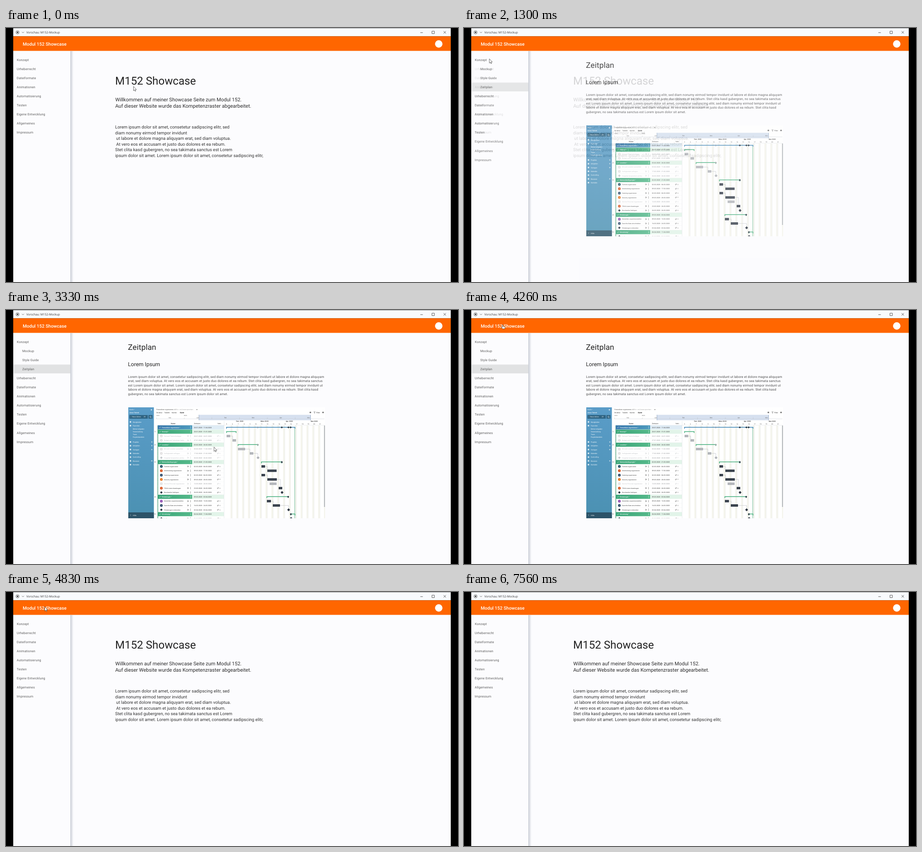
Animation, 998 px wide and 561 px high, one loop 7.59 s. Source, as an HTML page:

```html
<!DOCTYPE html>
<html lang="de">
<head>
<meta charset="utf-8">
<title>Showcase</title>
<style>
  html, body { margin: 0; width: 100%; height: 100%; overflow: hidden; background: #000; }
  svg { display: block; width: 998px; height: 561px; }
  text { font-family: Roboto, sans-serif; white-space: pre; text-rendering: geometricPrecision; }
</style>
</head>
<body>
<svg id="stage" viewBox="0 0 998 561"></svg>
<script>
const LOOP = 7590;
const PAGE = '#fcfcfe';

const rect = (x, y, w, h, fill, extra = '') =>
  `<rect x="${x}" y="${y}" width="${w}" height="${h}" fill="${fill}" ${extra}/>`;
const path = (d, stroke, width = 1, fill = 'none') =>
  `<path d="${d}" fill="${fill}" stroke="${stroke}" stroke-width="${width}"/>`;
const dot = (x, y, r, fill) => `<circle cx="${x}" cy="${y}" r="${r}" fill="${fill}"/>`;
const diamond = (x, y, fill, r = 3.2) => path(`M${x - r} ${y}l${r} ${-r} ${r} ${r} ${-r} ${r}z`, 'none', 0, fill);
const text = (x, y, size, str, fill = '#222', extra = '') =>
  `<text x="${x}" y="${y}" font-size="${size}" fill="${fill}" ${extra}>${str}</text>`;
const lines = (x, y, step, size, list, fill, extra) =>
  list.map((str, i) => text(x, y + i * step, size, str, fill, extra)).join('');

const SPACED = 'letter-spacing=".125"';
const BOLD = 'font-weight="500"';
const MIDDLE = 'text-anchor="middle"';

const topics = ['Urheberrecht', 'Dateiformate', 'Animationen', 'Automatisierung',
  'Testen', 'Eigene Entwicklung', 'Allgemeines', 'Impressum'];

function sidebar(sub) {
  const item = (str, i, x) => text(x, 72.7 + i * 20.08, 7.04, str, '#5c5c5c', SPACED);
  return rect(16, 50, 966, 511, PAGE) +
    rect(142, 51, 7, 510, 'url(#shade)') +
    (sub.length ? rect(17, 120.5, 125, 19.5, '#e1e2e3') : '') +
    item('Konzept', 0, 24) +
    sub.map((s, i) => item(s, i + 1, 36)).join('') +
    topics.map((s, i) => item(s, i + 1 + sub.length, 23.8)).join('');
}

function homePage() {
  return sidebar([]) +
    text(241, 124.7, 24.15, 'M152 Showcase') +
    lines(241.2, 161.6, 14.6, 11.05, [
      'Willkommen auf meiner Showcase Seite zum Modul 152.',
      'Auf dieser Website wurde das Kompetenzraster abgearbeitet.'], '#2a2a2a') +
    lines(241, 222, 12.6, 9.55, [
      'Lorem ipsum dolor sit amet, consetetur sadipscing elitr, sed',
      'diam nonumy eirmod tempor invidunt',
      ' ut labore et dolore magna aliquyam erat, sed diam voluptua.',
      ' At vero eos et accusam et justo duo dolores et ea rebum.',
      'Stet clita kasd gubergren, no sea takimata sanctus est Lorem',
      'ipsum dolor sit amet. Lorem ipsum dolor sit amet, consetetur sadipscing elitr,'], '#333');
}

// kind, label, period, bar start, bar end (a single start means a milestone)
const rows = [
  ['main', 'Firmenfeier organisieren', '20.01.2020 - 11.04.2020', 487, 638],
  ['group', 'Konzept', '20.01.2020 - 31.01.2020', 487, 508],
  ['done', 'Ziel und Thema festlegen', '20.01.2020 - 24.01.2020', 487, 495],
  ['done', 'Budget und Teilnehmer festle...', '27.01.2020 - 31.01.2020', 500, 508],
  ['group', 'Location', '03.02.2020 - 26.02.2020', 512.5, 556],
  ['done', 'Ort und Location auswählen', '03.02.2020 - 11.02.2020', 512, 528],
  ['done', 'Verfügbarkeit anfragen', '17.02.2020 - 21.02.2020', 538, 546],
  ['done', 'Vorgehen besprechen und bu...', '26.02.2020 - 26.02.2020', 556.5],
  ['group', 'Rahmenbedingungen', '02.03.2020 - 21.03.2020', 564, 609],
  ['#1d4e63', 'Technik organisieren', '02.03.2020 - 06.03.2020', 564, 572],
  ['#d9541e', 'Unterhaltung organisieren', '09.03.2020 - 17.03.2020', 577, 597.5],
  ['#2a4868', 'Catering organisieren', '02.03.2020 - 06.03.2020', 564, 572],
  ['#e8751a', 'Security organisieren', '09.03.2020 - 20.03.2020', 577, 598],
  ['done', 'Service-Personal organisieren', '12.03.2020 - 20.03.2020', 582, 597.5],
  ['#d9541e', 'TOVA-Lizenz beantragen', '23.03.2020 - 26.03.2020', 602, 610],
  ['#26343f', 'Druckwerke festlegen', '26.03.2020 - 26.03.2020', 609.5],
  ['group', 'Einladungen', '09.03.2020 - 03.04.2020', 576, 623],
  ['#8e4ab0', 'Gästeliste zusammenstellen', '09.03.2020 - 13.03.2020', 576, 585],
  ['#2a4868', 'Save-the-Date einschreiben', '16.03.2020 - 24.03.2020', 589, 605],
  ['#26343f', 'Einladungen vorbereiten', '03.04.2020 - 03.04.2020', 624],
  ['group', 'Umsetzung', '06.04.2020 - 11.04.2020', 629, 638],
  ['#26343f', 'Aufbau', '06.04.2020 - 06.04.2020', 629.5]
];
const rowY = i => 259.2 + i * 9.585;

function ganttRow([kind, label, period, from, to], i) {
  const y = rowY(i), summary = kind === 'main' || kind === 'group', done = kind === 'done';
  const ink = done ? '#b9bcc0' : '#333';
  let out = '';
  if (summary) {
    const color = kind === 'main' ? '#3b83b4' : '#43ae7c';
    out += rect(335, y - 4.5, 76, 9, kind === 'main' ? 'url(#blueRow)' : 'url(#greenRow)') +
      rect(411, y - 4.5, 70, 9, kind === 'main' ? '#dfecf5' : '#e2f4e9') +
      path(`M338.5 ${y}l1.2 1.3 2-2.8`, '#fff', .6) +
      text(344, y + 1.3, 3.5, label + ' ˅', '#fff', BOLD) +
      path(`M${from} ${y + 2.8}V${y - .3}H${to}V${y + 2.8}`, color, 1.5);
  } else {
    out += rect(335, y + 4.7, 146, .3, '#e6e8ea');
    out += to ? dot(343, y, 3, done ? '#e3e1e2' : kind) + path(`M342 ${y}l.8 1 1.5-2`, '#fff', .5)
              : diamond(343, y, done ? '#c5c8cb' : kind, 2.8);
    out += text(349, y + 1.3, 3.4, label, ink) +
      path(`M401 ${y - 1.5}l2.5 1.5-2.5 1.5z`, ink, .5) +
      `<ellipse cx="468" cy="${y}" rx="1.6" ry=".9" fill="none" stroke="${ink}" stroke-width=".5" transform="rotate(-40 468 ${y})"/>` +
      text(471.5, y + 1.2, 3.3, '2', ink);
    const bar = done ? '#adb0b5' : '#2b3440';
    out += to ? rect(from, y - 2.6, to - from, 5.2, bar) + rect(from, y - .3, to - from, .6, '#ffffff55')
              : diamond(from, y, bar);
  }
  for (const d of [-1.7, 0, 1.7]) out += dot(407.5, y + d, .5, summary ? '#fff' : ink);
  return out + text(415, y + 1.3, 3.62, period, done ? '#8b8e92' : '#333');
}

function gantt() {
  let out = rect(270, 215, 434.5, 245, '#fff') + rect(270, 215, 56.5, 245, 'url(#nav)') +
    rect(270, 447, 56.5, 13, '#2c5368') +
    text(272, 221, 3.4, 'Studio ˅', '#fff') + text(272, 227.5, 3.6, 'Jonas Tabrek', '#fff', BOLD) +
    dot(321, 220.5, 1.4, '#d4e5ef') +
    rect(272.5, 232, 40.5, 8, '#2f6483') + rect(314.5, 232, 9, 8, '#2f6483') +
    text(275, 237.4, 3.5, '✓ Neue Aktion', '#fff') + text(304, 237.4, 3.5, '29', '#fff') +
    path('M320 237.5l1.3 1.5', '#fff', .5) + `<circle cx="319" cy="236" r="1.5" fill="none" stroke="#fff" stroke-width=".5"/>` +
    text(274, 454.7, 4, '?', '#fff') + text(280, 454.7, 3.7, 'Hilfe', '#fff');

  const menu = (y, list) => list.forEach((s, i) => {
    const cy = y + i * 8.35;
    out += rect(273.3, cy - 1.5, 3, 3, '#e6f0f6') + text(280, cy + 1.4, 3.6, s, '#fff');
  });
  menu(247.2, ['Neuigkeiten', 'Favoriten']);
  out += lines(280, 263.8, 6.15, 3.5, ['Meine Aufgaben', 'Veranstaltung', 'Team', 'Projektüberblick'], '#fff');
  menu(291.5, ['Projekte', 'Aufgaben', 'Vorlagen', 'Kalender', 'Controlling', 'Benutzer', 'Kontakte']);
  for (const y of [291.5, 299.8, 308.2, 333.2]) out += dot(322, y, 1.3, '#b9d4e3');

  out += text(332, 221.3, 3.5, 'Firmenfeier organisieren  4.9 ☆', '#444') +
    text(379, 221.3, 3.4, '| ○ auf heute speichern', '#999') + path('M420 219.5h3l-1.5 1.6z', 'none', 0, '#444') +
    text(332, 227.7, 3.7, 'Struktur', '#333') + text(349.5, 227.7, 3.7, 'Tabelle', '#333') +
    text(366, 227.7, 3.7, 'Karten', '#333') + text(384, 227.7, 3.7, 'Gantt', '#111', 'font-weight="700"') +
    dot(672, 226.3, 1.8, '#777') + dot(700, 226.3, 1.8, '#777') +
    path('M679.5 224.7h3.4l-1.3 1.7v2l-.8-.5v-1.5z', '#333', .4) + text(685, 227.7, 3.7, 'Filter', '#333');

  out += rect(426, 231.5, 246.5, 12, '#d6e0ef') + rect(332, 240.3, 371, .5, '#c3c9d2') +
    rect(425.5, 231.5, 1, 12, '#9db1cc') + rect(672, 231.5, 1, 12, '#9db1cc') +
    text(332, 234, 3, '2019', '#555') + text(396, 234, 3, '2020', '#555', MIDDLE);
  ['Dez', 'Jan', 'Feb', 'Mrz', 'Apr', 'Mai'].forEach((m, i) => {
    out += text(362 + i * 61.2, 238.6, 3.2, m, '#555', MIDDLE) + rect(332 + i * 61.2, 237.5, .4, 3, '#aaa');
  });

  out += text(369, 252.3, 3.7, 'Name', '#333', MIDDLE + ' ' + BOLD) + text(415, 252.3, 3.6, 'Zeitraum', '#333') +
    text(467, 252.3, 3.6, 'Verk...', '#333');
  ['Feb. 2020', 'März 2020', 'Apr. 2020', 'Mai 2020'].forEach((m, i) => {
    out += text(516 + i * 54.8, 246.8, 3.7, m, '#333', MIDDLE + ' ' + BOLD);
  });
  for (let week = 0; week < 17; week++) {
    const x = 487 + week * 12.9;
    out += text(x, 252.6, 3.4, week + 5, '#444', MIDDLE) +
      rect(x + 8.8, 255, 3.8, 205, '#f4f4ec') + rect(x + 12.6, 255, .4, 205, '#e2e5ea');
  }
  out += rect(335, 254.2, 368, .4, '#d5d9dd') + rect(481, 245, .5, 215, '#d5d9dd') +
    rect(334.6, 255, 1.2, 205, '#39966c') + rect(637.2, 259, .9, 201, '#5eb58d');

  // dependency links between bars
  const link = (x, row, x2, row2) => {
    out += path(`M${x} ${rowY(row)}H${x2}V${rowY(row2) - 3}`, '#a3a9b3', .5);
  };
  link(495, 2, 500.5, 3); link(528, 5, 538.5, 6); link(546, 6, 556, 7); link(572, 9, 577, 10);
  link(572, 11, 577.5, 12); link(598, 12, 606, 14); link(585, 17, 590, 18); link(605, 18, 624, 19);

  out += rows.map(ganttRow).join('');
  [1, 4, 8, 16, 20].forEach((row, i) => { out += text(328, rowY(row) + 1.4, 3.7, i + 1, '#333', BOLD); });
  const marks = [[556, 0, '#8ba3b5'], [609, 0], [623.5, 0], [628.5, 0], [556, 4, '#9aa5a2'], [609, 8], [623, 16], [629, 20]];
  for (const [x, row, fill = '#26343f'] of marks) out += diamond(x, rowY(row), fill, 2.3);
  return `<g clip-path="url(#shot)">${out}${rect(702.3, 255, 2, 180, '#abb0b6')}</g>`;
}

function planPage() {
  return sidebar(['Mockup', 'Style Guide', 'Zeitplan']) +
    text(269.3, 87.6, 17.1, 'Zeitplan', '#222', SPACED) +
    text(269.3, 123.6, 12.07, 'Lorem Ipsum') +
    lines(269.5, 149.6, 9.6, 7.04, [
      'Lorem ipsum dolor sit amet, consetetur sadipscing elitr, sed diam nonumy eirmod tempor invidunt ut labore et dolore magna aliquyam',
      'erat, sed diam voluptua. At vero eos et accusam et justo duo dolores et ea rebum. Stet clita kasd gubergren, no sea takimata sanctus',
      'est Lorem ipsum dolor sit amet. Lorem ipsum dolor sit amet, consetetur sadipscing elitr, sed diam nonumy eirmod tempor invidunt ut',
      'labore et dolore magna aliquyam erat, sed diam voluptua. At vero eos et accusam et justo duo dolores et ea rebum. Stet clita kasd',
      'gubergren, no sea takimata sanctus est Lorem ipsum dolor sit amet.'], '#4c4c4c', SPACED) +
    gantt();
}

function windowFrame() {
  return rect(16, 0, 966, 18.3, '#f8fafd') + rect(16, 18.3, 966, 32.2, '#ff6600') +
    rect(16, 0, 966, .6, '#555') +
    `<circle cx="25.5" cy="9.6" r="3.6" fill="none" stroke="#555" stroke-width=".8"/>` +
    rect(23.9, 8, 3.2, 3.2, '#444') + path('M35.3 8.6l2.2 2.2 2.2-2.2', '#444', .8) +
    text(45, 12, 6.42, 'Vorschau: M152-Mockup', '#333', `style="font-family:'Open Sans',sans-serif"`) +
    path('M914.8 10.2h5.6M940.5 7h5.4v5.4h-5.4zM966.2 7l5.2 5.2M971.4 7l-5.2 5.2', '#333', .8) +
    text(37, 38.5, 10.06, 'Modul 152 Showcase', '#fff', BOLD) + dot(955.5, 35.3, 8.2, '#fff');
}

const gradient = (id, dir, a, b) =>
  `<linearGradient id="${id}" x2="${dir}" y2="${1 - dir}"><stop stop-color="${a}"/><stop offset="1" stop-color="${b}"/></linearGradient>`;

const stage = document.getElementById('stage');
stage.innerHTML = `<defs>
  ${gradient('shade', 1, '#c9cdd6', PAGE)}${gradient('nav', 0, '#5a9cc8', '#4b91b2')}
  ${gradient('blueRow', 1, '#3a79ad', '#4d9bbd')}${gradient('greenRow', 1, '#3aa578', '#55b98a')}
  <clipPath id="shot"><rect x="270" y="215" width="434.5" height="245"/></clipPath></defs>
  <g>${homePage()}</g><g id="plan">${planPage()}</g>${windowFrame()}
  <g id="cursor"><g id="arrow">${path('M0 0V9.6L2.2 7.6 3.6 10.8 5 10.2 3.6 7.1H6.6Z', '#333', .7, '#fff')}</g>
  <g id="hand">${path('M-1 .6q.9-1.2 1.8 0v3l3.4.8q1 .3.8 1.3l-.7 3.5h-4.3l-3.2-3.7q.4-1 2.2.2z', '#333', .7, '#fff')}</g></g>`;

const [plan, cursor, arrow, hand] = ['plan', 'cursor', 'arrow', 'hand'].map(id => document.getElementById(id));

const progress = (t, from, to) => Math.min(1, Math.max(0, (t - from) / (to - from)));
const easeOut = u => 1 - (1 - u) ** 1.7;
const easeInOut = u => u * u * (3 - 2 * u);

// start time, end time, x, y
const moves = [[30, 620, 56, 68], [1620, 2400, 487, 268], [2480, 3160, 493, 327],
  [3200, 3940, 85.5, 32.5], [5300, 5366, 29, 73]];

function draw() {
  const t = performance.now() % LOOP;
  plan.setAttribute('opacity', easeOut(progress(t, 1110, 1410)) - easeOut(progress(t, 4500, 4800)));
  let x = 281.5, y = 129;
  for (const [from, to, toX, toY] of moves) {
    const u = easeInOut(progress(t, from, to));
    x += (toX - x) * u;
    y += (toY - y) * u;
  }
  const pointing = t > 3800 && t < 4500 && y < 50;
  cursor.setAttribute('transform', `translate(${x} ${y})`);
  cursor.setAttribute('visibility', t < 5400 ? 'visible' : 'hidden');
  arrow.setAttribute('display', pointing ? 'none' : 'inline');
  hand.setAttribute('display', pointing ? 'inline' : 'none');
  requestAnimationFrame(draw);
}
draw();
</script>
</body>
</html>
```
